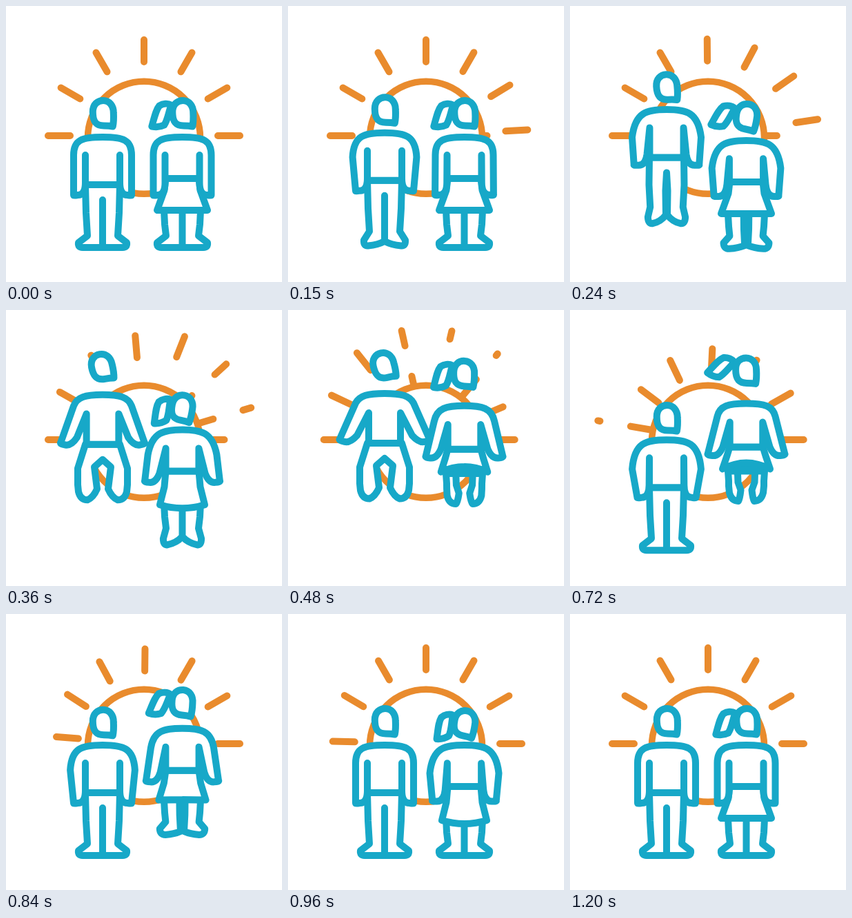
An HTML page that plays this animation: 400 by 400 pixels, repeating every 1.38 s.

```html
<!DOCTYPE html>
<html lang="en">
<head>
<meta charset="utf-8">
<title>Jumping pair</title>
<style>
html, body { margin: 0; width: 100%; height: 100%; overflow: hidden; background: #fff; }
svg { display: block; width: 100vw; height: 100vh; }
path, circle { stroke-width: 10; stroke-linecap: round; stroke-linejoin: round; }
.sun { fill: none; stroke: #e98b2d; }
.body { fill: #fff; stroke: #17a8c8; }
</style>
</head>
<body>
<svg id="stage" viewBox="0 0 400 400"></svg>
<script>
const LOOP = 1380, STEP = 30, END = 1200;
const stage = document.getElementById('stage');

function add(tag, cls, attrs = {}) {
  const el = document.createElementNS('http://www.w3.org/2000/svg', tag);
  el.setAttribute('class', cls);
  for (const k in attrs) el.setAttribute(k, attrs[k]);
  return stage.appendChild(el);
}

// ---------- timing ----------
const clamp = (v, a, b) => Math.min(b, Math.max(a, v));
const mix = (a, b, u) => a + (b - a) * u;
const mixAll = (a, b, u) => a.map((v, i) => mix(v, b[i], u));

function smooth(a, b, t) {
  const u = clamp((t - a) / (b - a), 0, 1);
  return u * u * (3 - 2 * u);
}
// Rises over a..b, holds, falls over c..d
const pulse = (t, a, b, c, d) => smooth(a, b, t) - smooth(c, d, t);

// cubic-bezier(.33, 0, .4, 1)
function ease(x) {
  x = clamp(x, 0, 1);
  let lo = 0, hi = 1;
  for (let i = 0; i < 24; i++) {
    const s = (lo + hi) / 2, r = 1 - s;
    if (3 * r * r * s * .33 + 3 * r * s * s * .4 + s ** 3 < x) lo = s; else hi = s;
  }
  return lo * lo * (3 - 2 * lo);
}

// ---------- sun ----------
const CX = 200, CY = 188, RIM = 82, TRAVEL = 77;
add('circle', 'sun', { cx: 200, cy: 190.8, r: 81.5, style: 'stroke-width:9.5' });
const rays = add('path', 'sun');

function ray(deg, from, to) {
  if (to <= from) return '';
  const a = deg * Math.PI / 180;
  const p = r => (CX + r * Math.cos(a)).toFixed(2) + ' ' + (CY - r * Math.sin(a)).toFixed(2);
  return `M${p(from)}L${p(to)}`;
}

function drawRays(t) {
  let d = '';
  // Each ray swings one place on as it leaves, with a new one rising behind it
  for (let k = 0; k < 6; k++) {
    const e = ease((t - 60 * k) / 840), deg = 30 * (k + e), s = TRAVEL * e;
    d += ray(deg, 107 + s, Math.min(162, 139 + s));
    if (62 + s > RIM + 4) d += ray(deg, Math.max(RIM, 30 + s), 62 + s);
  }
  const rise = 58 * (1 - ease(t / 780));
  d += ray(0, Math.max(RIM, 107 - rise), 139 - rise);
  const gone = 47 * ease((t - 400) / 340);
  d += ray(180, 107 + gone, Math.min(153, 139 + gone));
  rays.setAttribute('d', d);
}

// ---------- mirrored outlines ----------
const COUNT = { L: 1, Q: 2, C: 3 };

function run(cmds, pts) {
  let i = 1, d = '';
  for (const c of cmds) {
    d += c + pts.slice(i, i + COUNT[c]).map(p => p.map(v => v.toFixed(2)).join(' ')).join(' ');
    i += COUNT[c];
  }
  return d;
}

// Left half around x = 0, then its mirror image
function both(cmds, flat) {
  const pts = [];
  for (let i = 0; i < flat.length; i += 2) pts.push([flat[i], flat[i + 1]]);
  const back = pts.map(([x, y]) => [-x, y]).reverse();
  return `M${pts[0]}` + run(cmds, pts) + `L${back[0]}` + run([...cmds].reverse(), back) + 'Z';
}

// ---------- body shapes, from simple controls ----------
const HEAD = 'M14 19C9 18 4 18 1 18C-12 18 -15 10 -15 -2C-15 -13 -8 -18.5 0 -18.5' +
  'C9 -18.5 15 -11 15 -1C15.5 8 15 14 14 19Z';
const TAIL = 'M-28 31C-24 17 -22 7 -17 1C-12 -2 -5 -3 0 0C-4 12 -5 22 -10 29C-16 32 -23 32 -28 31Z';

// Armpit, hand and shoulder, measured from the top of the shoulders
const HANGING = [-25, 26, -25, 66, -25, 84, -36, 84, -42, 85, -42, 84, -42, 26, -42, 4, -30, 0, 0, 0];
const SPREAD = [-23, 28, -40, 61, -50, 72, -58, 70, -67, 68, -65, 66, -42, 14, -36, 3, -24, 0, 0, 0];
const ELBOW = 12;

// Toe, round of the toe and sole, measured from the ankle
const FLAT = [-13, 10, -14, 17, -7, 17];
const POINTED = [-4, 15, -4, 25, 2, 24];
const DANGLING = [1, 10, 4, 22, 14, 22];

function torso(spine, spread, elbow) {
  const arm = mixAll(HANGING, SPREAD, spread);
  arm[ELBOW] -= 8 * elbow;
  arm[ELBOW + 1] += 17 * elbow;
  arm[ELBOW + 2] -= 5 * elbow;
  return both('LLQQLC', [mix(-25, -23, spread), spine, ...arm]);
}

function legs({ hip, shin, splay, slit, gap }, tuck, toe) {
  const ax = -(hip - 3 + splay * tuck), ay = shin - 15.5 * tuck;
  const foot = mixAll(mixAll(FLAT, POINTED, toe), DANGLING, tuck)
    .map((v, i) => v + (i % 2 ? ay : ax));
  const [bx, by] = foot.slice(4);
  const ix = -8 * tuck, iy = ay + mix(mix(17, 12, toe), 6, tuck);
  return both('LLLQQLL', [
    -hip, 0,
    -(hip - 1 + (splay - 2) * tuck), .55 * shin - 6 * tuck,
    ax, ay, ...foot,
    mix(bx, ix, .6), mix(by, iy, .2),
    ix, iy,
    -12 * tuck, shin * (.68 - .24 * tuck),
    -gap * tuck, slit - .7 * gap * tuck
  ]);
}

function skirt(tuck, swing) {
  const len = 46 - 14 * tuck + 3 * swing, hem = len - 9 * tuck + 5 * swing;
  return both('LLQ', [-24, 0, -26 - 2 * tuck, 17 - 4 * tuck + 6 * swing,
    -36.5 + 2 * tuck + 4 * swing, len, -17, hem, 0, hem]);
}

// ---------- the pair ----------
const man = {
  x: 140, waist: 259, spine: 69, lag: 0, jump: 68, reach: 1, neck: 6,
  arms: [150, 440, 520, 740],
  tilt: m => -13 * m.spread,
  leg: { hip: 25, shin: 74, splay: 14, slit: 22, gap: 0 },
  parts: ['head', 'legs', 'torso']
};
const woman = {
  x: 255.5, waist: 250, spine: 60, lag: 180, jump: 60, reach: .6, neck: 13,
  arms: [-60, 240, 540, 920],
  tilt: m => 11 * m.elbow,
  leg: { hip: 26.5, shin: 37, splay: 2, slit: 0, gap: 13 },
  parts: ['tail', 'head', 'legs', 'skirt', 'torso']
};

for (const who of [man, woman]) {
  who.el = {};
  for (const n of who.parts) who.el[n] = add('path', 'body');
  who.el.head.setAttribute('d', HEAD);
  if (who.el.tail) who.el.tail.setAttribute('d', TAIL);
}

// Crouch, leap along a parabola, land
const PEAK = 430, HALF = 294, TAKEOFF = PEAK - HALF;

function motion(who, time) {
  const t = time - who.lag;
  const crouch = t > 0 && t < TAKEOFF ? Math.sin(Math.PI * t / TAKEOFF) : 0;
  const air = Math.max(0, 1 - ((t - PEAK) / HALF) ** 2);
  const rise = pulse(t, 110, 185, 250, 320);
  const swing = rise + pulse(t, 600, 730, 780, 920);
  return {
    crouch, rise, swing,
    y: who.waist + 5 * crouch - who.jump * air,
    tuck: pulse(t, 220, 310, 560, 720),
    spread: who.reach * pulse(t, ...who.arms),
    elbow: Math.min(1, crouch + swing),
    flop: 14 * crouch + 27 * pulse(t, 350, 520, 580, 720) - 8 * swing
  };
}

function drawPerson(who, time) {
  const m = motion(who, time), { el, x } = who;
  const spine = who.spine + 3 * m.tuck, top = m.y - spine;
  const headX = x + .8 - 2 * m.spread;
  const headY = top - 34.5 - who.neck * m.tuck + 3 * m.swing;
  const put = (n, px, py, turn = 0) =>
    el[n].setAttribute('transform', `translate(${px} ${py}) rotate(${turn})`);

  put('head', headX, headY, who.tilt(m));
  put('torso', x, top);
  el.torso.setAttribute('d', torso(spine, m.spread, m.elbow));
  put('legs', x, m.y + (el.skirt ? 46 - 11 * m.tuck : 0));
  el.legs.setAttribute('d', legs(who.leg, Math.min(1, m.tuck + .3 * m.crouch), m.rise));
  if (el.skirt) {
    put('skirt', x, m.y);
    el.skirt.setAttribute('d', skirt(m.tuck, m.swing));
    put('tail', headX - 17, headY - 12, m.flop);
  }
}

function draw(ms) {
  const t = Math.min(END, Math.floor((ms % LOOP) / STEP) * STEP);
  drawRays(t);
  drawPerson(man, t);
  drawPerson(woman, t);
}

const begin = performance.now();
function tick() {
  draw(performance.now() - begin);
  requestAnimationFrame(tick);
}
tick();
</script>
</body>
</html>
```
